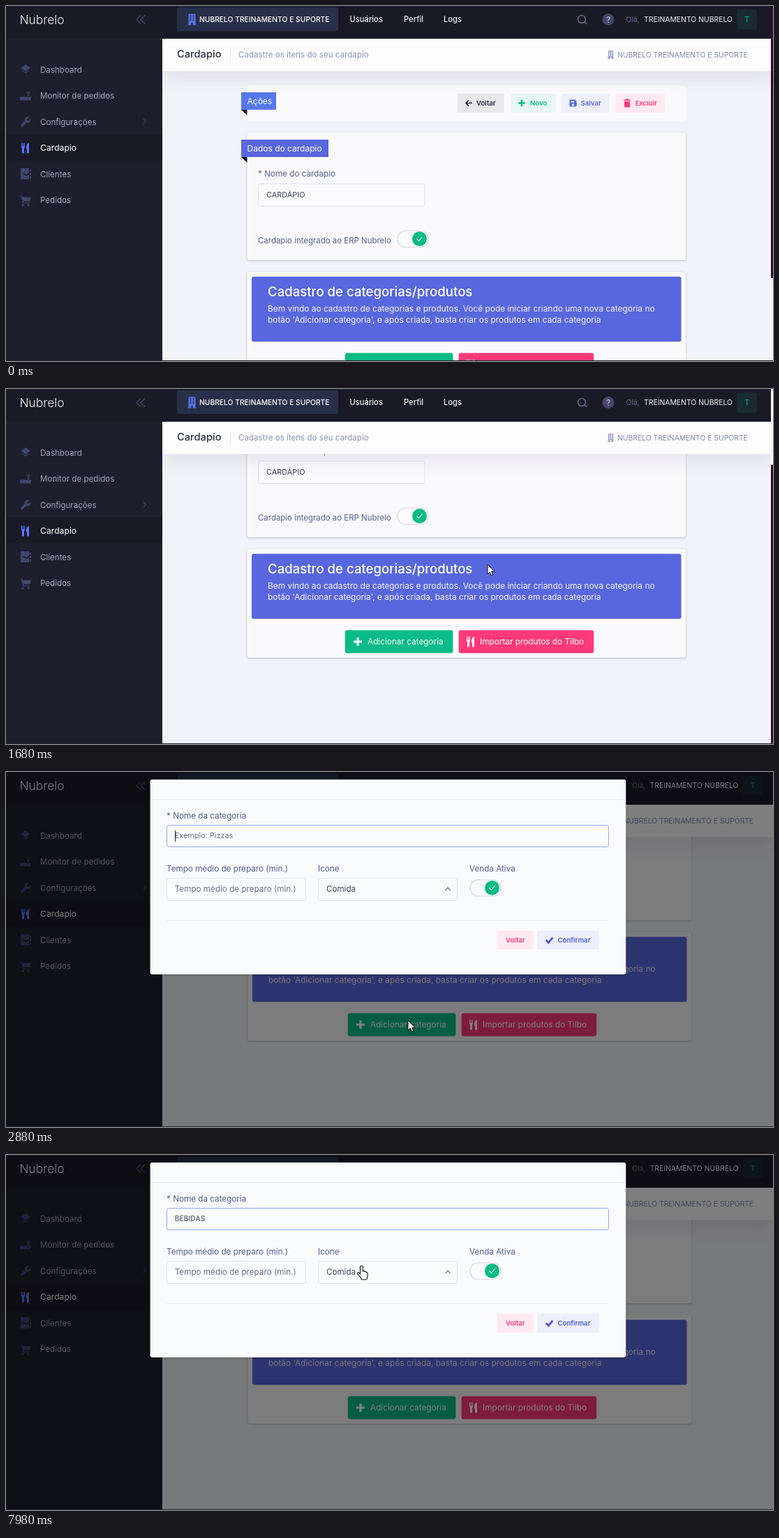
Recreate the animation shown at these times as an HTML page with a canvas. Size 1099 by 510 pixels, loop 8000 ms.

```html
<!DOCTYPE html>
<html lang="pt-BR">
<head>
<meta charset="utf-8">
<title>Cardapio</title>
<style>
html, body { margin: 0; width: 100%; height: 100%; overflow: hidden; background: #f2f3f8; }
canvas { display: block; }
</style>
</head>
<body>
<canvas id="stage" width="1099" height="510"></canvas>
<script>
const ctx = document.getElementById('stage').getContext('2d');
const LOOP = 8000, STEP = 60;
const BRAND = 'Nubrelo', SUPPORT = 'NUBRELO TREINAMENTO E SUPORTE';
const INDIGO = '#5867dd', GREEN = '#0abb87', PINK = '#fd397a';
const LABEL = '#555a8c', FIELD = '#41454f', ICON = '#42456c', MENU = '#a2a3b7';

const clamp = v => Math.max(0, Math.min(1, v));
const ease = v => { v = clamp(v); return v * v * (3 - 2 * v); };
const mix = (a, b, k) => a + (b - a) * k;

function rect(x, y, w, h, color) {
  ctx.fillStyle = color;
  ctx.fillRect(x, y, w, h);
}

function box(x, y, w, h, r, fill, stroke) {
  ctx.beginPath();
  ctx.roundRect(x, y, w, h, r);
  if (fill) { ctx.fillStyle = fill; ctx.fill(); }
  if (stroke) { ctx.strokeStyle = stroke; ctx.lineWidth = 1; ctx.stroke(); }
}

function text(s, x, y, color, size = 11.7, weight = 400) {
  ctx.font = `${weight} ${size}px Inter, "Open Sans", sans-serif`;
  ctx.fillStyle = color;
  ctx.fillText(s, x, y);
}

function disc(x, y, r, color) {
  ctx.beginPath();
  ctx.arc(x, y, r, 0, 7);
  ctx.fillStyle = color;
  ctx.fill();
}

function shadowed(blur, dy, color, draw) {
  ctx.save();
  ctx.shadowBlur = blur;
  ctx.shadowOffsetY = dy;
  ctx.shadowColor = color;
  draw();
  ctx.restore();
}

// Paths are centred on 0,0.
const shapes = {
  layers: 'M0-7L7-2L0 3L-7-2ZM-7 1L0 6L7 1L0 4Z',
  router: 'M-8 2H8V7H-8ZM3-2H5V3H3Z',
  wrench: 'M-7 5L-1-1C-2-5 2-8 5-6L2-3L4-1L7-4C8 0 5 3 1 2L-5 8Z',
  cutlery: 'M-6-7H-5V-2H-4V-7H-3V-2H-2V-7H-1V-1L-2 1V8H-5V1L-6-1ZM5-7V8H2V2H1C1-3 2-6 5-7Z',
  book: 'M-7-8H5V8H-7ZM6-6H8V-3H6ZM6-1H8V2H6ZM6 4H8V7H6Z',
  cart: 'M-8-6H-5L-4-4H8L6 2H-3L-2 4H6V5H-4L-6-5H-8Z',
  tower: 'M-5-8H5V7H6V8H1V4H-1V8H-6V7H-5ZM-3-6V-4H-1V-6ZM1-6V-4H3V-6ZM-3-3V-1H-1V-3ZM1-3V-1H3V-3ZM-3 0V2H-1V0ZM1 0V2H3V0Z',
  plus: 'M-1.6-6H1.6V-1.6H6V1.6H1.6V6H-1.6V1.6H-6V-1.6H-1.6Z',
  disk: 'M-5-5H3L5-3V5H-5ZM-3-3V-1H2V-3ZM-1.5 1V4H1.5V1Z',
  trash: 'M-5-5H-2V-6H2V-5H5V-3.5H-5ZM-4-2.5H4V6H-4Z',
  back: 'M5 0H-4M0-4L-4 0L0 4',
  check: 'M-4 0L-1 3L4-3',
  right: 'M-2-3.5L1.5 0L-2 3.5',
  up: 'M-3.5 2L0-2L3.5 2',
  fold: 'M5-6L-1 0L5 6M-1-6L-7 0L-1 6',
  waves: 'M1-4Q4-7 7-4M2.5-2.5Q4-4 5.5-2.5',
  arrow: 'M0 0V14L3.3 11L5.6 16L7.8 15L5.5 10.2H10Z',
  hand: 'M-2 1Q-2-1 0-1Q2-1 2 1V7Q3.5 6 4.5 7.5Q6 7 6.7 8.5Q8.5 8 8.5 10V14Q8.5 17 7 19H0Q-1 16-3 14L-6 10.5Q-6.5 8.5-4 9L-2 11Z'
};
for (const k in shapes) shapes[k] = new Path2D(shapes[k]);

function icon(name, x, y, color, scale = 1) {
  ctx.save();
  ctx.translate(x, y);
  ctx.scale(scale, scale);
  ctx.fillStyle = color;
  ctx.fill(shapes[name], 'evenodd');
  ctx.restore();
}

function line(name, x, y, color, width = 1.2, scale = 1) {
  ctx.save();
  ctx.translate(x, y);
  ctx.scale(scale, scale);
  ctx.strokeStyle = color;
  ctx.lineWidth = width;
  ctx.stroke(shapes[name]);
  ctx.restore();
}

function card(x, y, w, h) {
  shadowed(3, 1, 'rgba(50,50,75,.3)', () => box(x, y, w, h, 3, '#fafafc'));
}

function ribbon(s, x, y, w, color) {
  rect(x, y, w, 25, color);
  ctx.beginPath();
  ctx.moveTo(x, y + 25);
  ctx.lineTo(x + 8.5, y + 25);
  ctx.lineTo(x + 8.5, y + 33);
  ctx.fillStyle = '#16161d';
  ctx.fill();
  text(s, x + 8.5, y + 16.5, '#fff', 12);
}

function toggle(x, y) {
  ctx.beginPath();
  ctx.roundRect(x + 1, y + 1, 44, 23.5, 12);
  ctx.fillStyle = '#fcfcfd';
  ctx.fill();
  ctx.strokeStyle = '#dfe1e8';
  ctx.lineWidth = 1.7;
  ctx.stroke();
  disc(x + 32.5, y + 12.5, 10.5, GREEN);
  line('check', x + 32.5, y + 12.5, '#fff', 1.1);
}

function smallButton(s, x, y, w, tx, fill, color) {
  box(x, y, w, 27, 2, fill);
  text(s, tx, y + 17, color, 9.6, 600);
}

function sidebar() {
  rect(0, 0, 224, 510, '#1e1e2d');
  rect(0, 0, 224, 47, '#1a1a27');
  rect(0, 184, 224, 38, '#1a1a27');
  text(BRAND, 19.5, 26, '#f4f4f8', 17.3, 300);
  line('fold', 194, 19.5, ICON, 1.4);
  const items = [['Dashboard', 'layers'], ['Monitor de pedidos', 'router'], ['Configurações', 'wrench'],
    ['Cardapio', 'cutlery'], ['Clientes', 'book'], ['Pedidos', 'cart']];
  items.forEach(([name, glyph], i) => {
    const y = 91 + i * 37.5, on = i === 3;
    icon(glyph, 28, y, on ? '#5d78ff' : ICON);
    text(name, 49, y + 4.5, on ? '#fff' : MENU, on ? 12.2 : 11.6);
  });
  line('waves', 28, 129, ICON);
  line('right', 199, 166, ICON);
  ctx.beginPath();
  ctx.arc(29, 238, 4.5, .5, 2.6);
  ctx.strokeStyle = '#1e1e2d';
  ctx.lineWidth = 2;
  ctx.stroke();
  disc(24, 286, 1.5, ICON);
  disc(32, 286, 1.5, ICON);
}

function header(dx) {
  rect(224, 0, 875, 47, '#1a1a27');
  box(245, 2, 231, 34, 3, '#282f49');
  icon('tower', 266.5, 19.5, '#5578eb');
  text(SUPPORT, 277, 23.3, '#fff', 10.3, 500);
  text('Usuários', 492.5, 23.3, '#f0f0f5', 11.2, 500);
  text('Perfil', 570, 23.3, '#f0f0f5', 11.2, 500);
  text('Logs', 627, 23.3, '#f0f0f5', 11.2, 500);
  ctx.beginPath();
  ctx.arc(825 + dx, 19, 5.5, 0, 7);
  ctx.moveTo(829 + dx, 23);
  ctx.lineTo(832 + dx, 26);
  ctx.strokeStyle = '#636886';
  ctx.lineWidth = 1.6;
  ctx.stroke();
  disc(863 + dx, 19.5, 8.5, '#43476a');
  text('?', 860 + dx, 24, '#aeb2ca', 11.5, 600);
  text('Olá,', 888.5 + dx, 23, '#6c7293', 10.4);
  text('TREINAMENTO ' + BRAND.toUpperCase(), 914 + dx, 23.3, '#f0f0f5', 10.4);
  box(1047 + dx, 5, 29, 29, 3, '#192b33');
  text('T', 1058.3 + dx, 23.3, GREEN, 10.8);
}

function subheader(dx) {
  shadowed(28, 8, 'rgba(82,63,105,.13)', () => rect(224, 47, 875, 46.5, '#fdfdfe'));
  text('Cardapio', 245, 74.2, '#2f3042', 14.7, 500);
  rect(321, 61, 1, 19, '#e4e6ee');
  text('Cadastre os itens do seu cardapio', 333, 74, '#8f94b2', 11.6);
  icon('tower', 866.5 + dx, 70, '#9fa4c8', .75);
  text(SUPPORT, 876 + dx, 74, '#8489ab', 10.35);
}

function content(scroll, wide, hover) {
  const l = wide ? 346.5 : 345.5, w = wide ? 635.5 : 628.5, x = l - 345.5, dx = wide ? 8 : 0;
  ctx.save();
  ctx.translate(0, -scroll);

  box(l, 114, w, 51, 3, '#fafafc');
  ribbon('Ações', 337 + x, 124, 50, '#5578eb');
  smallButton('Voltar', 647 + dx, 126, 67, 674 + dx, '#e9e9ec', '#282a3c');
  line('back', 663 + dx, 139.5, '#282a3c', 1.7);
  smallButton('Novo', 723 + dx, 126, 65, 751 + dx, '#e6f8f3', GREEN);
  icon('plus', 739 + dx, 139.5, GREEN, .8);
  smallButton('Salvar', 796 + dx, 126, 69, 823.5 + dx, '#eeeffb', INDIGO);
  icon('disk', 812.5 + dx, 139.5, INDIGO);
  smallButton('Excluir', 873 + dx, 126, 71, 901.5 + dx, '#ffe9f0', PINK);
  icon('trash', 890 + dx, 139.5, PINK);

  card(l, 182, w, 183);
  ribbon('Dados do cardapio', 337 + x, 192, 125, INDIGO);
  text('* Nome do cardapio', 361 + x, 245, LABEL);
  box(361.5 + x, 255.5, wide ? 241 : 238.5, 32, 3, '#fbfbfd', '#e3e5ec');
  text('CARDÁPIO', 373 + x, 275, FIELD, 10.9);
  text('Cardapio integrado ao ERP ' + BRAND, 361 + x, 340.5, LABEL, 11.45);
  toggle(560 + x, 322);

  card(l, 382, w, 156);
  box(352 + x, 388.7, w - 13, 93.6, 3, INDIGO);
  text('Cadastro de categorias/produtos', 375 + x, 416.5, '#fff', 18.6, 500);
  text('Bem vindo ao cadastro de categorias e produtos. Você pode iniciar criando uma nova categoria no',
    375 + x, 438.5, '#f3f4ff', 11.9);
  text("botão 'Adicionar categoria', e após criada, basta criar os produtos em cada categoria",
    375 + x, 454.8, '#f3f4ff', 11.9);

  const b = dx / 2;
  const tint = `rgb(9,${mix(187, 151, hover)},${mix(135, 109, hover)})`;
  box(485.8 + b, 498.6, 154.6, 32.8, 3, tint);
  icon('plus', 504 + b, 515, '#fff');
  text('Adicionar categoria', 518 + b, 519, '#fff', 11.8);
  box(648.6 + b, 498.6, 193.6, 32.8, 3, PINK);
  icon('cutlery', 666 + b, 514.5, '#fff');
  text('Importar produtos do Tilbo', 679 + b, 519, '#fff', 11.8);
  ctx.restore();
}

function scrollbar(scroll) {
  rect(1096, 0, 3, 510, '#f7f5f8');
  rect(1096, -9 + scroll * .775, 3, 400, '#380638');
}

const keyTimes = [4800, 4920, 5280, 5520, 5760, 6120, 6300];

function caretOn(t) {
  if (t >= 4800 && t < 6780) return true;
  return t < 3420 || (t >= 3900 && t < 4440) || (t >= 7320 && t < 7800);
}

function dialog(t) {
  shadowed(3, 1, 'rgba(0,0,0,.3)', () => box(206.6, 10.8, 681.6, 280, 3, '#fafbfd'));
  rect(207, 39, 681, 1, '#eceef3');
  text('* Nome da categoria', 230, 66.5, LABEL);
  box(230.5, 76.5, 633, 31, 3, '#fbfcfe', '#96a3fa');
  const typed = 'BEBIDAS'.slice(0, keyTimes.filter(k => t >= k).length);
  if (typed) text(typed, 241.7, 95.3, FIELD, 10.4);
  else text('Exemplo: Pizzas', 241.7, 95.3, '#6c7081', 10.9);
  if (caretOn(t)) {
    const end = typed ? ctx.measureText(typed).width : 0;
    rect(Math.round(242 + end), 84, 1, 16, '#22232c');
  }
  const prep = 'Tempo médio de preparo (min.)';
  text(prep, 230, 142.5, LABEL);
  text('Icone', 447, 142.5, LABEL);
  text('Venda Ativa', 664, 142.5, LABEL);
  box(230.5, 152.5, 199, 32, 3, '#fbfcfe', '#e3e5ec');
  text(prep, 241.7, 172, '#6c7081');
  box(447.5, 152.5, 199, 32, 3, '#fbfcfe', '#e3e5ec');
  text('Comida', 459, 172, FIELD, 11.6);
  line('up', 633, 168, '#70758a');
  toggle(664, 154);
  rect(230, 213, 634, 1, '#ebedf2');
  smallButton('Voltar', 704, 228, 52, 716, '#ffe9f0', PINK);
  smallButton('Confirmar', 761, 228, 89, 790.5, '#eeeffb', '#4c5bd6');
  line('check', 778.5, 241.5, '#4c5bd6', 2.4, 1.2);
}

// time, x, y of the pointer tip
const path = [[240, 1086, 112], [780, 697, 261], [1500, 697, 261], [1680, 690, 252],
  [2340, 573, 342], [2520, 576, 357], [3360, 576, 357], [3900, 493, 149]];

function pointer(t) {
  if (t < 240) return;
  if (t >= 7980) {
    icon('hand', 509.5, 160, '#fff');
    line('hand', 509.5, 160, '#111', 1.1);
    return;
  }
  const next = path.findIndex(p => p[0] > t);
  const b = path.at(next), a = next < 0 ? b : path[next - 1];
  const k = a === b ? 1 : ease((t - a[0]) / (b[0] - a[0]));
  const x = mix(a[1], b[1], k), y = mix(a[2], b[2], k);
  icon('arrow', x, y, '#fff');
  line('arrow', x, y, '#111', 1);
}

function scrollAt(t) {
  const second = t < 1140 ? 0 : t < 1260 ? .65 : 1;
  return 85 * ease((t - 780) / 180) + 67 * second;
}

function draw(now) {
  const t = Math.floor((now % LOOP) / STEP) * STEP;
  const wide = t >= 2820, dx = wide ? 8.5 : 0, scroll = scrollAt(t);
  const hover = t < 2880 ? clamp((t - 2340) / 180) : 0;
  rect(0, 0, 1099, 510, '#f2f3f8');
  content(scroll, wide, hover);
  subheader(dx);
  header(dx);
  sidebar();
  if (wide) rect(0, 0, 1099, 510, 'rgba(0,0,0,.5)');
  else scrollbar(scroll);
  rect(0, 509, 1099, 1, '#24222b');
  if (t >= 2880) dialog(t);
  pointer(t);
}

function tick() {
  draw(performance.now());
  requestAnimationFrame(tick);
}
tick();
</script>
</body>
</html>
```
